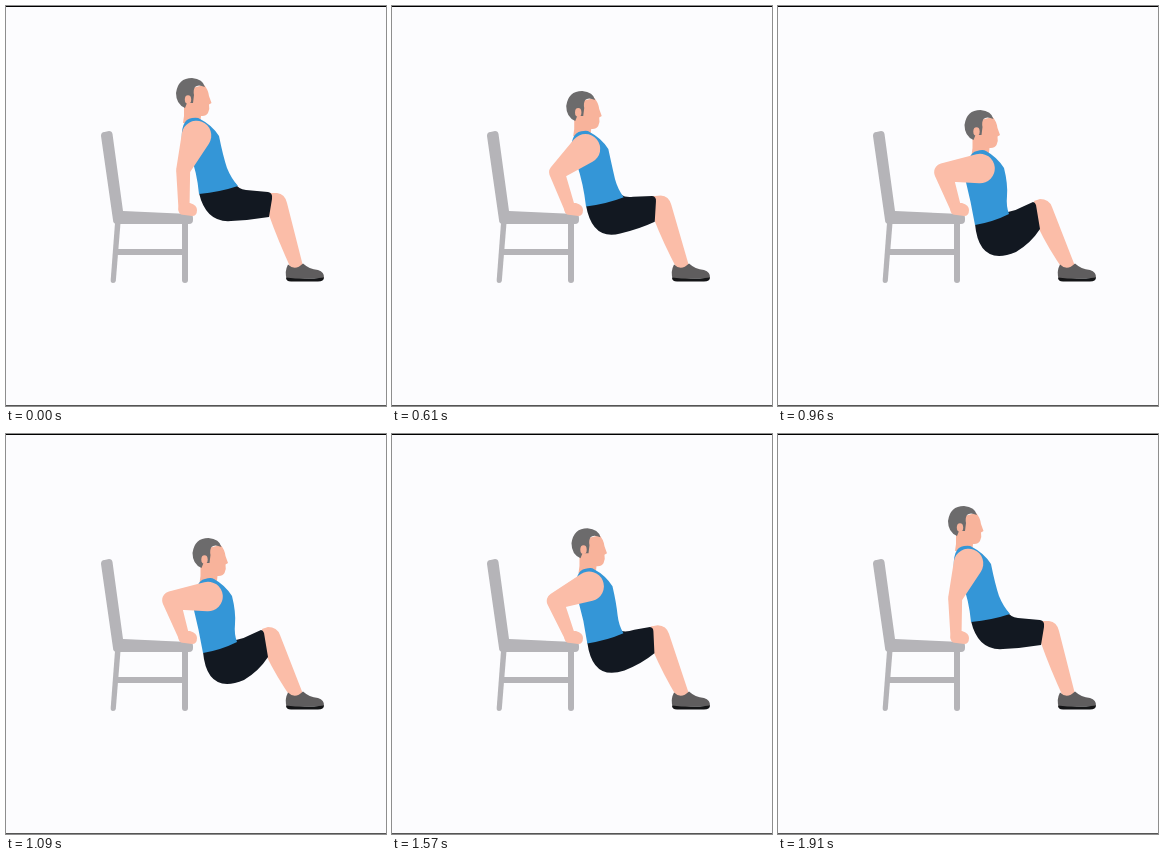
Animation of 380x400 px, one loop 2.08 s. Source, as an HTML page:

```html
<!DOCTYPE html>
<html lang="en">
<head>
<meta charset="utf-8">
<title>Chair dips</title>
<style>
  html, body { margin: 0; width: 100%; height: 100%; overflow: hidden; background: #fcfcfe; }
  svg { display: block; width: 100vw; height: 100vh; }
  .skin { fill: #fbbda8; }
  .face { fill: #f8b39b; }
  .chair { fill: #b5b4b8; }
  .hair { fill: #6c6b6c; }
</style>
</head>
<body>
<svg viewBox="0 0 380 400">
  <rect width="380" height="400" fill="#fcfcfe"/>
  <g class="chair">
    <path d="M95 130Q95 126 98.500 126L103 125Q106 125 106.500 128L117 205L183 208Q187 208 187 212V214Q187 218 183 218H111Q107 218 107 214Z"/>
    <path d="M109 217H114.500L109.800 275Q109.500 277 107 277Q104.500 277 104.700 274Z"/>
    <path d="M176 217H182V274Q182 277 179 277Q176 277 176 274Z"/>
    <rect x="111" y="243" width="67" height="6"/>
  </g>
  <path id="leg" class="skin"/>
  <path d="M282 258.500Q289 265.500 297 257.500Q303 263 312 264Q318.500 266 318 272L281 273.500Q278 266 282 258.500Z" fill="#5f5d5e"/>
  <path d="M280 271.500Q298 274 318 271.500Q318 275.500 312 275.500H285Q280 275.500 280 271.500Z" fill="#141517"/>
  <path id="shorts" fill="#121821"/>
  <g id="head">
    <path class="face" d="M178 92L186 82L198 79Q202 83 203 90L205.500 97L203 98.500Q204 103 202 107Q200 110.500 195 110L194 119L177 117Q178.500 110 178 101Z"/>
    <path class="hair" d="M179 102Q170 98 170 87Q172 72 186 72Q197 73 199 81Q192 78 189 81Q187 84 188 89L187 97L181 97Z"/>
    <ellipse class="face" cx="182" cy="93.500" rx="3.200" ry="4.300"/>
  </g>
  <path id="shirt" fill="#3496d7"/>
  <path id="arm" class="skin"/>
  <path class="skin" d="M173 200Q174 197 178 197H184Q191 199 191 204Q191 210 186 210L175 208.500Q171 206 173 200Z"/>
  <rect width="380" height="1" fill="#000"/>
  <rect y="399" width="380" height="1" fill="#555"/>
</svg>
<script>
const LOOP = 2080, STEP = 43.5, STEPS = 12;
const DOWN = 430, UP = 1430;
const HAND = { x: 178, y: 203 }, UPPER = 37, FORE = 39;
const el = id => document.getElementById(id);
const lerp = (a, b, p) => a + (b - a) * p;

// raised and lowered outlines, same commands in both
const shapes = {
  leg: [
    "M262 187L271 187Q279 188 281 197L297 260L286 265Q271 232 263 209Z",
    "M256 195L262 193Q271 193 274 201L297 260L286 265Q270 242 260 221Z"
  ],
  shorts: [
    "M193 187L229 177Q232 183 240 184L262 186Q267 187 266 193L263 211Q245 214 225 215Q200 217 193 187Z",
    "M197 218L230 206Q237 205 244 201L255 196Q257 196 258 199L262 223Q253 237 238 246Q201 261 197 218Z"
  ],
  shirt: [
    "M176 138Q174 113 186 112Q192 111 194 113Q206 119 213 130Q217 150 221 162Q225 172 232 180Q214 186 193 188Q191 166 184 148Z",
    "M189 172Q188 147 199 145Q205 143 208 145Q219 151 226 162Q230 178 229 190Q228 200 231 208Q215 216 197 219Q193 196 187 172Z"
  ]
};

// sideways travel builds up later than the drop
const sway = p => p ** 1.5;

function blend([a, b], p) {
  const to = b.match(/\d+/g);
  let i = 0;
  return a.replace(/\d+/g, n => {
    const part = i % 2 ? p : sway(p);
    return lerp(+n, +to[i++], part).toFixed(2);
  });
}

// tapered limb segment with round ends
function limb(a, ra, b, rb) {
  const d = Math.hypot(b.x - a.x, b.y - a.y);
  const dir = Math.atan2(b.y - a.y, b.x - a.x), tilt = Math.acos((ra - rb) / d);
  const at = (c, r, t) => `${(c.x + r * Math.cos(t)).toFixed(2)} ${(c.y + r * Math.sin(t)).toFixed(2)}`;
  return `M${at(a, ra, dir + tilt)}A${ra} ${ra} 0 1 1 ${at(a, ra, dir - tilt)}` +
    `L${at(b, rb, dir - tilt)}A${rb} ${rb} 0 0 1 ${at(b, rb, dir + tilt)}Z`;
}

function arm(p) {
  const s = { x: lerp(190.5, 202, sway(p)), y: lerp(129.5, 162.5, p) };
  const dx = HAND.x - s.x, dy = HAND.y - s.y, d = Math.hypot(dx, dy);
  const along = (d * d + UPPER * UPPER - FORE * FORE) / (2 * d);
  const out = Math.sqrt(Math.max(0, UPPER * UPPER - along * along));
  const elbow = { x: s.x + (dx * along - dy * out) / d, y: s.y + (dy * along + dx * out) / d };
  const r = lerp(7, 9, p);
  return limb(s, 14.8, elbow, r) + limb(elbow, r, HAND, 5.5);
}

function travel(t) {
  const k = Math.floor(t / STEP) + 1;
  const u = Math.min(1, Math.max(0, k / STEPS));
  return lerp(u, 0.5 - 0.5 * Math.cos(Math.PI * u), 0.3);
}

function draw(t) {
  const p = t < DOWN ? 0 : t < UP ? travel(t - DOWN) : 1 - travel(t - UP);
  for (const id in shapes) el(id).setAttribute("d", blend(shapes[id], p));
  el("arm").setAttribute("d", arm(p));
  el("head").setAttribute("transform", `translate(${16.5 * sway(p)} ${32 * p})`);
}

const start = performance.now();
function tick() {
  draw((performance.now() - start) % LOOP);
  requestAnimationFrame(tick);
}
draw(0);
requestAnimationFrame(tick);
</script>
</body>
</html>
```
